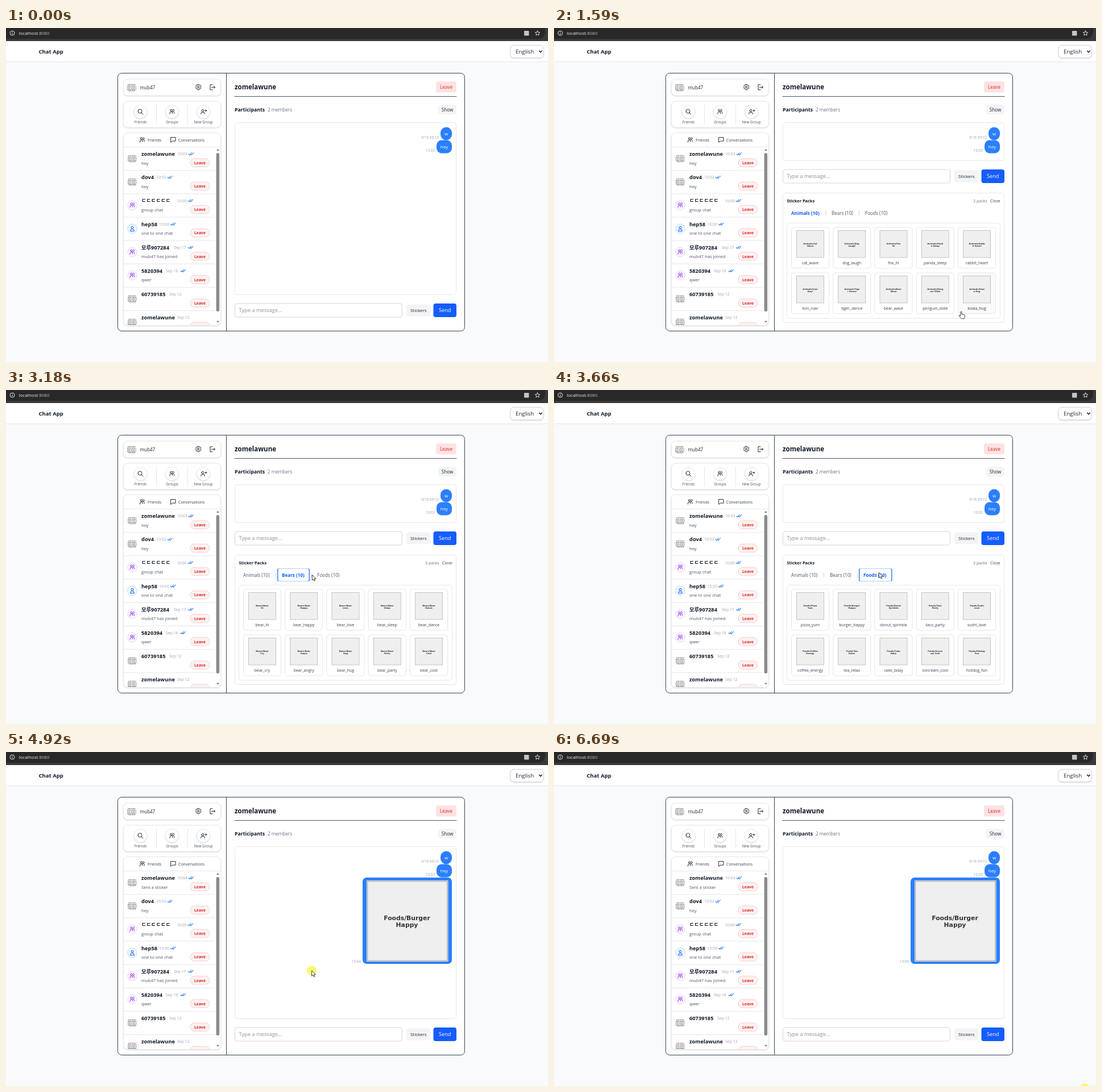
Animation of 953x588 px, one loop 6.75 s. Source, as an HTML page:

```html
<!DOCTYPE html>
<html lang="en">
<head>
<meta charset="utf-8">
<title>Chat App</title>
<style>
html, body { margin: 0; height: 100%; overflow: hidden; background: #f9fafb; }
svg { display: block; width: 100vw; height: 100vh; font-family: "Open Sans", "Noto Sans CJK KR", "Noto Sans CJK", sans-serif; }
text { white-space: pre; }
.card { filter: drop-shadow(0 1px 1px #0002); }
.icon { fill: none; stroke-linecap: round; stroke-linejoin: round; }
.sticker { font-family: "DejaVu Sans", sans-serif; }
</style>
</head>
<body>
<svg viewBox="0 0 953 588">
  <defs>
    <clipPath id="listClip"><rect x="207" y="185" width="170" height="338" rx="7"/></clipPath>
    <clipPath id="tabClip"><rect x="410" y="314.5" width="375" height="22"/></clipPath>
  </defs>
  <g id="base"></g>
  <g id="live"></g>
  <g id="pointer"></g>
</svg>
<script>
const LOOP = 6750;
const BLUE = '#2b7fff', DEEP = '#155dfc', INK = '#111827', GRAY = '#6b7280', PALE = '#9ca3af', LINE = '#e5e7eb', RED = '#dc2626';
const $ = id => document.getElementById(id);

const text = (x, y, size, str, fill = INK, weight = 400, anchor = 'start', extra = '') =>
  `<text x="${x}" y="${y}" font-size="${size}" fill="${fill}" font-weight="${weight}" text-anchor="${anchor}" ${extra}>${str}</text>`;
const mid = (x, y, size, str, fill, weight, extra) => text(x, y, size, str, fill, weight, 'middle', extra);
const rect = (x, y, w, h, rx, fill, stroke = 'none', extra = '') =>
  `<rect x="${x}" y="${y}" width="${w}" height="${h}" rx="${rx}" fill="${fill}" stroke="${stroke}" ${extra}/>`;
const circle = (x, y, r, fill, stroke = 'none') => `<circle cx="${x}" cy="${y}" r="${r}" fill="${fill}" stroke="${stroke}"/>`;
const path = (d, stroke, width = 1, extra = 'class="icon"') => `<path d="${d}" stroke="${stroke}" stroke-width="${width}" ${extra}/>`;
const icon = (x, y, d, color = '#1f2937', width = 1) => `<g transform="translate(${x} ${y})">${path(d, color, width)}</g>`;

// Icon outlines, centred on the origin
const PAIR = 'M-4 4v-1q0-3 2.5-3t2.5 3M0 0q1-1 2-.6 2 .6 2 3.4M-3.2-2.5a1.7 1.7 0 1 0 3.4 0a1.7 1.7 0 1 0-3.4 0M1-3.6a1.5 1.5 0 1 1 .6 2.3';
const ONE = 'M-2-2a2 2 0 1 0 4 0a2 2 0 1 0-4 0M-3.5 4q0-3.5 3.5-3.5t3.5 3.5z';
const PLUS = 'M-3-2a2 2 0 1 0 4 0a2 2 0 1 0-4 0M-4.5 4q0-3.5 3.5-3.5t3.5 3.5M3-2h3M4.5-3.5v3';
const LENS = 'M-4.5-1a3.5 3.5 0 1 0 7 0a3.5 3.5 0 1 0-7 0M1.5 1.5l3 3';
const BUBBLE = 'M-4-4h8v6.5h-5.5l-2.5 2z';
const EXIT = 'M0-4.5h-4v9h4M-1.5 0h6M2.5-2l2 2-2 2';
const GEAR = 'M-1-5h2l.6 1.5 1.7-.4 1.3 1.6-.8 1.3.8 2-1.2 1.8-1.7-.2-.7 1.9h-2l-.7-1.9-1.7.2-1.2-1.8.8-2-.8-1.3 1.3-1.6 1.7.4zM-1.6-.3a1.6 1.6 0 1 0 3.2 0a1.6 1.6 0 1 0-3.2 0';
const STAR = 'M0-4.2l1.2 2.8 3 .3-2.3 2 .7 3L0 2.3l-2.6 1.6.7-3-2.3-2 3-.3z';

// Round picture that reads as rows of tiny writing
function scribble(x, y) {
  const rows = [-5, -2.2, .6, 3.4, 5.4].map((dy, i) => {
    const w = [7, 8, 8, 8, 6][i];
    return path(`M${x - w} ${y + dy}h${2 * w}`, '#777', 1.3, `stroke-dasharray="${1.5 + i % 2} .8 2.4 1.1 1 .7"`);
  });
  return circle(x, y, 8.5, '#f6f6f6') + rows.join('');
}

function avatar(kind, x, y) {
  if (kind === 'group') return circle(x, y, 8.3, '#faf5ff', '#e9d5ff') + icon(x, y, PAIR, '#9333ea');
  if (kind === 'one') return circle(x, y, 8.3, '#eff6ff', '#bfdbfe') + icon(x, y, ONE, DEEP);
  return scribble(x, y);
}

const chats = [
  ['zomelawune', 301, '10:03', 'hey', 'image', 20],
  ['dov4', 264, '10:02', 'hey', 'image', 20],
  ['ㄷㄷㄷㄷㄷㄷ', 300, '10:00', 'group chat', 'group', 20],
  ['hep58', 269.5, '10:00', 'one to one chat', 'one', 20],
  ['모루907284', 295, 'Sep 17', 'mub47 has joined', 'group', 25.5],
  ['5820394', 281, 'Sep 16', 'qwer', 'group', 26],
  ['60739185', 287, 'Sep 12', '', 'image', 0],
  ['zomelawune', 301, 'Sep 12', '', 'image', 0]
];

function chatRow([name, timeX, time, sub, kind, check], i) {
  const y = 209.5 + 41.15 * i;
  const tick = x => `M${x} ${y + 12.3}l1.7 1.8 3.6-4`;
  return avatar(kind, 222, y + 20.3)
    + text(238, y + 15.6, 9.3, name, INK, 700)
    + (i ? text(timeX, y + 14.7, 6.9, time, PALE) + text(238, y + 31, 7.6, sub, '#4b5563') : '')
    + (check ? path(tick(timeX + check) + tick(timeX + check + 3.2), BLUE, 1.1) : '')
    + rect(324, y + 20.5, 34, 14.5, 7.2, '#fef2f2', '#fecaca') + mid(341, y + 30.5, 6.9, 'Leave', RED, 700)
    + path(`M207 ${y + 41.2}H367`, LINE);
}

function drawBase() {
  const shortcut = (x, d, label) =>
    `<g class="card">${circle(x, 147.5, 11.5, '#fff', LINE)}</g>` + icon(x, 147.5, d) + mid(x, 167.5, 6.3, label, '#4b5563');
  const card = (y, h) => rect(206.5, y, 171, h, 7, '#fff', LINE, 'class="card"');
  return rect(0, 0, 953, 588, 0, '#f9fafb')
    // browser bar
    + rect(0, 0, 953, 23, 0, '#3a3a3a') + rect(-20, -8, 968, 27, 12, '#282828')
    + circle(11, 9, 4, 'none', '#ddd') + path('M11 8.5v2.5M11 6.8v.1', '#ddd')
    + text(22.5, 12, 8, 'localhost<tspan fill="#bbb">:8080</tspan>', '#f1f1f1')
    + rect(911, 5, 8.5, 8.5, 1, '#c4c4c4') + icon(934.5, 9, STAR, '#ddd')
    // page header
    + rect(0, 23, 953, 36, 0, '#fff') + path('M0 59.5H953', LINE)
    + text(57.5, 45.3, 9.5, 'Chat App', INK, 700)
    + rect(887, 30.5, 58, 22, 6, '#fff', '#d1d5db', 'class="card"')
    + text(896, 45.3, 9.7, 'English', '#1f2937') + path('M937.5 40.3l2.4 2.5 2.4-2.5', INK, 1.4)
    // frame
    + rect(196.5, 79.5, 610, 454, 7, '#fff', '#374151') + path('M387.5 80V533', '#374151')
    // profile and shortcuts
    + card(90, 29) + scribble(221, 105) + text(235.5, 108, 8.1, 'mub47', '#1f2937')
    + icon(338.3, 104.3, GEAR) + icon(363, 104.3, EXIT)
    + card(129, 46) + path('M264.5 135V170M319.5 135V170', LINE)
    + shortcut(236.5, LENS, 'Friends') + shortcut(292, PAIR, 'Groups') + shortcut(347, PLUS, 'New Group')
    // conversations
    + card(184.5, 339)
    + icon(239.5, 197, PAIR) + text(249, 199.6, 7, 'Friends', '#374151')
    + icon(294, 196.6, BUBBLE) + text(303, 199.6, 6.95, 'Conversations', '#374151')
    + path('M207 209.5H377', LINE)
    + `<g clip-path="url(#listClip)">${chats.map(chatRow).join('')}</g>`
    + rect(369.6, 220, 5.6, 279, 2.8, '#8b8b8b')
    + path('M370 216l2.5-3 2.5 3zM370 515.8l2.5 3 2.5-3z', 'none', 0, 'fill="#777"')
    // room header
    + text(402, 108.4, 11.5, 'zomelawune', INK, 700)
    + rect(756, 94, 36, 19.5, 4, '#fee2e2') + mid(774, 107, 8.1, 'Leave', RED)
    + path('M402 120.5H792', '#4b5563')
    + text(402, 147.3, 8.75, 'Participants', INK, 700) + text(460, 147.3, 8.1, '2 members', GRAY)
    + rect(760, 135.5, 32, 16.5, 4, '#f3f4f6') + mid(776, 147, 8.2, 'Show', '#1f2937');
}

const packs = {
  Animals: 'cat_wave dog_laugh fox_hi panda_sleep rabbit_heart lion_roar tiger_dance bear_wave penguin_slide koala_hug',
  Bears: 'bear_hi bear_happy bear_love bear_sleep bear_dance bear_cry bear_angry bear_hug bear_party bear_cool',
  Foods: 'pizza_yum burger_happy donut_sprinkle taco_party sushi_love coffee_energy tea_relax cake_bday icecream_cool hotdog_fun'
};

function stickerText(pack, id, x, y, size, gap) {
  const title = id.replace('_', ' ').replace(/\b\w/g, c => c.toUpperCase());
  const full = `${pack}/${title}`, cut = Math.min(12, full.indexOf(' '));
  return [full.slice(0, cut), full.slice(cut).trim()]
    .map((s, i) => mid(x, y + i * gap, size, s, '#333', 700, 'class="sticker"')).join('');
}

function drawTabs(s) {
  const widths = { Animals: [47, 50], Bears: [38, 41], Foods: [40, 42.5] };
  let x = 417, out = '';
  for (const name in packs) {
    const on = name === s.pack, w = widths[name][+on];
    if (x > 417) out += path(`M${x - 10.5} 322v8`, '#d1d5db');
    out += text(x, 328.5, 8.15, name + ' (10)', on ? DEEP : name === s.hover ? BLUE : '#4b5563', on ? 700 : 400);
    if (name === s.focus)
      out += rect(x - 7.3, 314, w + 14.6, 23, 3, 'none', BLUE, 'stroke-width="1.5" clip-path="url(#tabClip)"');
    x += w + 21;
  }
  return out;
}

function drawPanel(s) {
  const cells = packs[s.pack].split(' ').map((id, i) => {
    const x = 417.5 + 73.25 * (i % 5), y = i < 5 ? 351 : 431, cx = x + 33;
    return rect(x, y, 66, 72, 4, id === s.hover ? '#f9fafb' : '#fff', LINE)
      + rect(x + 9, y + 5.5, 48, 47.5, 0, '#efefef', '#c4c4c4')
      + stickerText(s.pack, id, cx, y + 29.6, 3.65, 4)
      + mid(cx, y + 65, 6.9, id, '#374151')
      + (id === s.focus ? rect(x + 4.7, y + 4.6, 56.6, 63, 3.5, 'none', BLUE, 'stroke-width="1.5"') : '');
  });
  return rect(402.5, 290.5, 389, 228, 4, '#fff', LINE)
    + text(409.5, 307, 7.4, 'Sticker Packs', INK, 700)
    + text(737, 306.5, 7.1, '3 packs', GRAY) + text(767, 306.5, 7, 'Close', '#374151')
    + drawTabs(s) + rect(409.5, 343.5, 375, 167.5, 4, '#fff', LINE) + cells.join('');
}

function drawLive(s) {
  const dy = s.open ? -236 : 0;
  const [, x, time, sub] = chats[0];
  const stamp = (x, y, str) => text(x, y, 6.35, str, PALE, 400, 'end');
  return text(x, 224.2, 6.9, s.sent ? '10:04' : time, PALE) + text(238, 240.5, 7.6, s.sent ? 'Sent a sticker' : sub, '#4b5563')
    + rect(402.5, 166.5, 389, 303 + dy, 4, '#fff', LINE)
    + stamp(761, 195, '9/16 09:10') + rect(764, 174.5, 20, 23, 10, BLUE) + mid(774, 189, 8, 'w', '#fff')
    + stamp(754, 218, '10:03') + rect(757, 197.5, 27, 23, 9, BLUE) + mid(770.5, 212.2, 8, 'hey', '#fff')
    + (s.sent ? stamp(624, 371, '10:04') + rect(627, 221, 157, 152, 7, BLUE)
      + rect(634, 226, 143.5, 143, 1, '#efefef') + rect(635.5, 227.5, 140.5, 140, 0, 'none', '#a8a8a8', 'stroke-width="1.4"')
      + stickerText('Foods', 'burger_happy', 705, 296, 10.8, 12.4) : '')
    + `<g transform="translate(0 ${dy})">`
    + rect(402.5, 485, 294, 24, 4, '#fff', '#d1d5db') + text(409.5, 500.4, 9.25, 'Type a message...', '#8b8f98')
    + rect(704, 486.5, 42.5, 21, 4, '#f3f4f6') + mid(725.3, 500.3, 8, 'Stickers', '#1f2937')
    + rect(751.5, 485, 40.5, 24, 4, DEEP) + mid(771.7, 500.4, 9.25, 'Send', '#fff') + '</g>'
    + (s.open ? drawPanel(s) : '');
}

function stateAt(t) {
  const pick = list => list.reduce((v, [at, val]) => t >= at ? val : v, '');
  return {
    open: t >= 1210 && t < 4860,
    sent: t >= 4860,
    pack: pick([[0, 'Animals'], [2740, 'Bears'], [3540, 'Foods']]),
    hover: pick([[1270, 'koala_hug'], [2020, ''], [2500, 'Bears'], [3240, 'Foods'], [4440, ''], [4560, 'burger_happy']]),
    focus: pick([[2680, 'Bears'], [3480, 'Foods'], [4740, 'burger_happy']])
  };
}

// Pointer path: time, x, y
const track = [
  [480, 909, 529], [660, 850, 480], [840, 784, 447], [1020, 728, 478], [1140, 716, 499],
  [1900, 716, 499], [2020, 738, 470], [2200, 690, 400], [2380, 570, 345], [2560, 510, 329],
  [3060, 510, 329], [3180, 538, 325], [3300, 571, 321],
  [4260, 571, 321], [4440, 560, 344], [4620, 542, 377], [4740, 537, 384.5],
  [5340, 538, 385], [5520, 538, 385], [5700, 698, 406], [5880, 806, 464], [6060, 880, 540], [6240, 914, 590]
];
const clicks = [[1140, 1270], [2680, 2800], [3480, 3600], [4740, 4980], [6690, 6750]];
const ARROW = 'M.3.3v9.6l2.3-2 1.5 3.3 1.5-.7-1.5-3.2h3z';
const HAND = 'M-1 .8q1-1.2 2 0v4l4 .9q1.6.4 1.4 2l-.6 3.3q-.3 1.8-2 1.8h-2.7q-1.2 0-2-1.2l-3-4q-.3-1.4 1-1.2l1.9 1.3z';

function pointerAt(t) {
  if (t >= 6240) return [933, 592];
  const i = track.findIndex(k => k[0] > t) - 1;
  const [t0, x0, y0] = track[i], [t1, x1, y1] = track[i + 1];
  const p = Math.floor((t - t0) / 60) * 60 / (t1 - t0);
  return [x0 + (x1 - x0) * p, y0 + (y1 - y0) * p];
}

function drawPointer(t) {
  if (t < 480) return '';
  const [x, y] = pointerAt(t);
  const glow = clicks.some(([a, b]) => t >= a && t < b) ? '<circle r="8.5" fill="#fff200" opacity=".55"/>' : '';
  const hand = t >= 1210 && t < 2320;
  return `<g transform="translate(${x.toFixed(1)} ${y.toFixed(1)})">${glow}${path(hand ? HAND : ARROW, '#111', .8, 'fill="#fff"')}</g>`;
}

const shown = {};
function put(id, html) {
  if (shown[id] !== html) $(id).innerHTML = shown[id] = html;
}

const start = performance.now();
function tick() {
  const t = (performance.now() - start) % LOOP;
  put('live', drawLive(stateAt(t)));
  put('pointer', drawPointer(t));
  requestAnimationFrame(tick);
}
put('base', drawBase());
tick();
</script>
</body>
</html>
```
